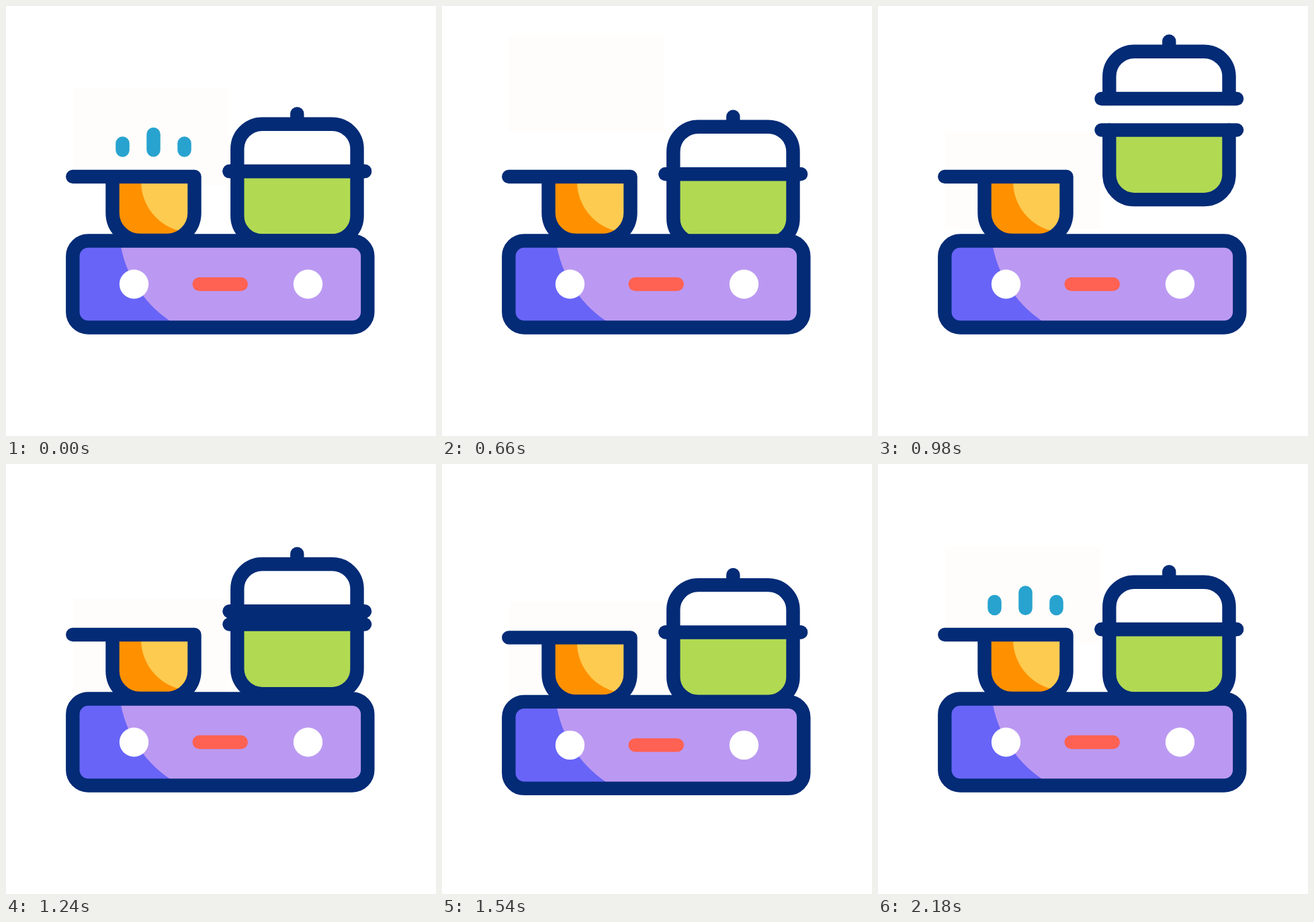
Write an HTML page that moves like this. It is 640 px wide and 640 px high and loops after 2200 ms.

```html
<!DOCTYPE html>
<html>
<head>
<meta charset="utf-8">
<style>
  html, body { margin: 0; width: 100%; height: 100%; overflow: hidden; background: #fff; }
  svg { display: block; width: 100vw; height: 100vh; }
  .line { stroke: #032b76; stroke-width: 20.4; stroke-linecap: round; stroke-linejoin: round; fill: none; }
</style>
</head>
<body>
<svg viewBox="0 0 640 640">
  <defs>
    <clipPath id="panClip"><path d="M158.5 254V308a41 41 0 0 0 41 41H239.500a41 41 0 0 0 41-41V254z"/></clipPath>
    <clipPath id="stoveClip"><rect x="99.300" y="349.500" width="439" height="129" rx="23"/></clipPath>
  </defs>

  <g id="steam">
    <rect x="100" y="123" width="231" height="144" fill="#fffdfb"/>
    <path id="puffs" d="M173.500 204.500v10M219.500 191v23.300M265.500 204.500v10"
      stroke="#28a3cf" stroke-width="20.500" stroke-linecap="round"/>
  </g>

  <g id="pan">
    <g clip-path="url(#panClip)">
      <rect x="150" y="250" width="140" height="105" fill="#ff9100"/>
      <circle cx="277" cy="261" r="76" fill="#fdcb50"/>
    </g>
    <path class="line" d="M99.300 254H280.500V308a41 41 0 0 1-41 41H199.500a41 41 0 0 1-41-41V254"/>
  </g>

  <g id="pot">
    <path class="line" style="fill:#b1d952" d="M344.300 246V312.500a37 37 0 0 0 37 37H485.500a37 37 0 0 0 37-37V246"/>
    <path class="line" d="M332.500 246H534"/>
  </g>

  <g id="lid">
    <path class="line" d="M433.300 160.500V175"/>
    <path class="line" style="fill:#fff" d="M344.300 246V212.700a37 37 0 0 1 37-37H485.500a37 37 0 0 1 37 37V246"/>
    <path class="line" d="M332.500 246H534"/>
  </g>

  <g id="stove">
    <g clip-path="url(#stoveClip)">
      <rect x="99" y="349" width="440" height="130" fill="#bb99f2"/>
      <path d="M99 349H169.500A173 173 0 0 0 254 475V479H99z" fill="#6864f7"/>
    </g>
    <rect class="line" x="99.300" y="349.500" width="439" height="129" rx="23"/>
    <circle cx="190.500" cy="414" r="21.700" fill="#fff"/>
    <circle cx="449.500" cy="414" r="21.700" fill="#fff"/>
    <rect x="277.500" y="403.800" width="82.500" height="20.400" rx="10.200" fill="#ff6152"/>
  </g>
</svg>
<script>
  const LOOP = 2200;
  const el = id => document.getElementById(id);
  const sine = u => (1 - Math.cos(Math.PI * u)) / 2;
  const cubic = u => u < .5 ? 4 * u ** 3 : 1 - 4 * (1 - u) ** 3;

  // Keys are [time, value, easing into this key].
  function at(t, keys) {
    if (t <= keys[0][0]) return keys[0][1];
    for (let i = 1; i < keys.length; i++) {
      const [t0, a] = keys[i - 1], [t1, b, ease = sine] = keys[i];
      if (t < t1) return a + (b - a) * ease((t - t0) / (t1 - t0));
    }
    return keys[keys.length - 1][1];
  }

  const hop = (height, t) => at(t, [[530, 0], [700, 4.7], [1050, -height, cubic],
    [1105, -height], [1347, 30.5], [1605, 0]]);
  const shake = [[0, 0], [150, -16], [300, 16], [450, -16], [600, 0]];
  const rise = [[0, 0], [540, -79], [660, -79], [1050, 77], [1850, 77], [2200, 0]];
  const fade = [[0, 1], [300, 0], [1840, 0], [1850, 1]];

  const move = (id, x, y) => el(id).setAttribute('transform', `translate(${x} ${y})`);

  function draw(now) {
    const t = now % LOOP;
    const pot = hop(63.5, t);
    const press = t > 1105 ? Math.max(0, pot) : 0;
    move('stove', 0, press);
    move('pan', at(t, shake), press);
    move('pot', 0, pot);
    move('lid', 0, hop(111.5, t));
    move('steam', 0, at(t, rise) + press);
    el('puffs').setAttribute('opacity', at(t, fade));
    requestAnimationFrame(draw);
  }
  draw(0);
</script>
</body>
</html>
```
